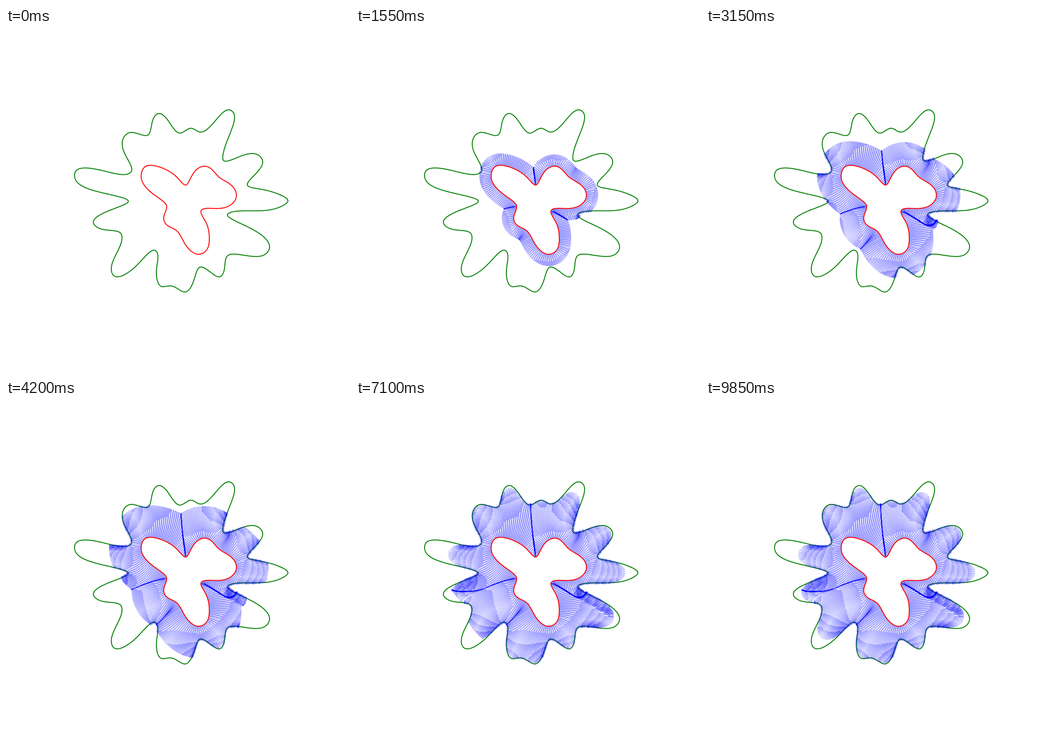
An HTML page with a canvas that plays this animation: 748x748 px, repeating every 10000 ms.

```html
<!DOCTYPE html>
<html lang="en">
<head>
<meta charset="utf-8">
<title>Growing field lines</title>
<style>
html, body { margin: 0; width: 100%; height: 100%; overflow: hidden; background: #fff; }
canvas { display: block; }
</style>
</head>
<body>
<canvas id="stage" width="748" height="748"></canvas>
<script>
const SIZE = 748, LOOP = 10000, TICK = 50, LAST_STEP = 197, SPEED = 0.83;
const LEFT = 120, TOP = 150, COLS = 520, ROWS = 450;

const outerKnots = [
  613,376, 592,361, 545,349, 525,342, 542,318, 558,289, 548,276, 515,277, 473,288, 472,275,
  490,222, 495,185, 485,178, 454,203, 421,226, 402,218, 379,228.5, 350,198, 332,186, 320,198,
  308,233, 272,227, 256,238, 256,268, 273,311, 266,317, 205,309, 152,311, 150,327, 200,356,
  266,377, 215,401, 190,423, 207,437, 249,446, 251,465, 229,522, 235,539, 278,522, 324,483.5,
  329,489, 327,530, 338,562, 360,561, 389,574, 408,550, 422,520, 446,532, 465,541, 474,528,
  481,496, 510,493, 562,493, 573,478, 540,440, 482,405, 487,401.5, 560,397, 604,385];
const innerKnots = [
  433,300.5, 447,307, 463,324, 485,338, 499,354, 500,370, 488,385, 460,392.5, 428,394, 424,398,
  434,421, 442,455, 436,483, 419,492, 400,483, 385,462, 370,440, 350,428.5, 343,412, 349.5,388,
  345,380, 315,357, 294,325, 302,302, 320,299, 350,309, 375,328, 391,341.5, 397,335, 413,309];

// Closed C2 cubic spline, sampled about once per pixel.
function spline(flat) {
  const n = flat.length / 2, knot = i => [flat[2 * (i % n)], flat[2 * (i % n) + 1]];
  const gap = [], slope = [], tangent = [];
  for (let i = 0; i < n; i++) {
    const [ax, ay] = knot(i), [bx, by] = knot(i + 1);
    gap[i] = Math.hypot(bx - ax, by - ay) ** 0.75;
    slope[i] = [(bx - ax) / gap[i], (by - ay) / gap[i]];
    tangent[i] = slope[i].slice();
  }
  for (let pass = 0; pass < 60; pass++) {
    for (let i = 0; i < n; i++) {
      const p = (i + n - 1) % n, q = (i + 1) % n;
      for (let c = 0; c < 2; c++) {
        tangent[i][c] = (3 * (gap[i] * slope[p][c] + gap[p] * slope[i][c])
          - gap[i] * tangent[p][c] - gap[p] * tangent[q][c]) / (2 * (gap[p] + gap[i]));
      }
    }
  }
  const points = [];
  for (let i = 0; i < n; i++) {
    const a = knot(i), b = knot(i + 1), q = (i + 1) % n;
    const count = Math.ceil(Math.hypot(b[0] - a[0], b[1] - a[1]));
    for (let j = 0; j < count; j++) {
      const t = j / count, s = 1 - t;
      points.push([0, 1].map(c => s * s * (1 + 2 * t) * a[c] + t * t * (3 - 2 * t) * b[c]
        + gap[i] * t * s * (s * tangent[i][c] - t * tangent[q][c])));
    }
  }
  return points;
}

function toPath(points) {
  const path = new Path2D();
  points.forEach(p => path.lineTo(p[0], p[1]));
  path.closePath();
  return path;
}

const inner = spline(innerKnots);
const innerPath = toPath(inner), outerPath = toPath(spline(outerKnots));
const normals = inner.map((p, i) => {
  const a = inner[(i + inner.length - 1) % inner.length], b = inner[(i + 1) % inner.length];
  const len = Math.hypot(b[0] - a[0], b[1] - a[1]);
  return [(b[1] - a[1]) / len, (a[0] - b[0]) / len];
});

function newContext(width, height) {
  const canvas = document.createElement("canvas");
  canvas.width = width;
  canvas.height = height;
  return canvas.getContext("2d");
}

// Harmonic potential: 0 inside the red curve, 1 outside the green one.
function solvePotential() {
  const mask = newContext(COLS, ROWS);
  mask.translate(-LEFT, -TOP);
  mask.fillStyle = "#0f0";
  mask.fill(outerPath);
  mask.fillStyle = "#f00";
  mask.fill(innerPath);
  const rgba = mask.getImageData(0, 0, COLS, ROWS).data;
  const field = new Float32Array(COLS * ROWS), free = [];
  for (let i = 0; i < field.length; i++) {
    if (rgba[4 * i + 3] < 128) field[i] = 1;
    else if (rgba[4 * i] < rgba[4 * i + 1]) { field[i] = 0.6; free.push(i); }
  }
  const cells = Int32Array.from(free);
  for (let pass = 0; pass < 220; pass++) {
    for (const i of cells) {
      const mean = (field[i - 1] + field[i + 1] + field[i - COLS] + field[i + COLS]) / 4;
      field[i] += 1.92 * (mean - field[i]);
    }
  }
  return field;
}

const field = solvePotential();

function potential(x, y) {
  x -= LEFT + 0.5;
  y -= TOP + 0.5;
  const c = Math.floor(x), r = Math.floor(y), u = x - c, v = y - r, i = r * COLS + c;
  return (field[i] * (1 - u) + field[i + 1] * u) * (1 - v)
    + (field[i + COLS] * (1 - u) + field[i + COLS + 1] * u) * v;
}

// Distance from the red curve and the direction leading away from it.
function awayFromInner(x, y) {
  let best = Infinity, index = 0;
  for (let i = 0; i < inner.length; i++) {
    const dx = x - inner[i][0], dy = y - inner[i][1], d = dx * dx + dy * dy;
    if (d < best) { best = d; index = i; }
  }
  const dist = Math.sqrt(best);
  if (dist < 2) return { dist, nx: normals[index][0], ny: normals[index][1] };
  return { dist, nx: (x - inner[index][0]) / dist, ny: (y - inner[index][1]) / dist };
}

function advance(p, level, segments) {
  const { dist, nx, ny } = awayFromInner(p.x, p.y);
  p.nx = nx;
  p.ny = ny;
  if (dist >= level) return;
  let gx = potential(p.x + 1.5, p.y) - potential(p.x - 1.5, p.y);
  let gy = potential(p.x, p.y + 1.5) - potential(p.x, p.y - 1.5);
  const steep = Math.hypot(gx, gy) || 1, mix = potential(p.x, p.y);
  gx = mix * gx / steep + (1 - mix) * nx;
  gy = mix * gy / steep + (1 - mix) * ny;
  const len = Math.hypot(gx, gy) || 1;
  gx /= len;
  gy /= len;
  const step = Math.min(2.2, (level - dist) / Math.max(0.3, gx * nx + gy * ny));
  let x = p.x + gx * step, y = p.y + gy * step;
  if (potential(x, y) > 0.995) {
    p.done = true;
    x += 1.8 * gx;
    y += 1.8 * gy;
  }
  segments.push([p.x, p.y, x, y]);
  p.x = x;
  p.y = y;
}

// Fill widening gaps so the advancing front stays evenly covered.
function refine(front) {
  const result = [];
  front.forEach((p, i) => {
    result.push(p);
    const q = front[(i + 1) % front.length];
    if (p.done || q.done || front.length > 3000) return;
    const gap = Math.hypot(q.x - p.x, q.y - p.y);
    if (gap < 3.2 || gap > 14 || p.nx * q.nx + p.ny * q.ny < 0.85) return;
    const x = (p.x + q.x) / 2, y = (p.y + q.y) / 2;
    if (potential(x, y) < 0.99) result.push({ x, y, nx: p.nx, ny: p.ny, done: false });
  });
  return result;
}

function growLines() {
  const count = 480, steps = [[]];
  let front = Array.from({ length: count }, (_, i) => {
    const k = Math.floor(i * inner.length / count);
    return { x: inner[k][0], y: inner[k][1], nx: normals[k][0], ny: normals[k][1], done: false };
  });
  for (let k = 1; k <= LAST_STEP; k++) {
    const segments = [];
    front.forEach(p => { if (!p.done) advance(p, k * SPEED, segments); });
    steps.push(segments);
    front = refine(front);
  }
  return steps;
}

const steps = growLines();
const ctx = document.getElementById("stage").getContext("2d");
const ink = newContext(SIZE, SIZE);
ink.strokeStyle = "#00f";
ink.lineWidth = 0.7;
let drawn = 0;

function drawInk(step) {
  if (step < drawn) {
    ink.clearRect(0, 0, SIZE, SIZE);
    drawn = 0;
  }
  while (drawn < step) {
    ink.beginPath();
    for (const [x0, y0, x1, y1] of steps[++drawn]) {
      ink.moveTo(x0, y0);
      ink.lineTo(x1, y1);
    }
    ink.stroke();
  }
}

function outline(path, color) {
  ctx.strokeStyle = color;
  ctx.lineWidth = 2;
  ctx.lineJoin = "round";
  ctx.stroke(path);
}

let origin = null;
function render(now) {
  if (origin === null) origin = now;
  drawInk(Math.min(LAST_STEP, Math.floor((now - origin) % LOOP / TICK)));
  ctx.fillStyle = "#fff";
  ctx.fillRect(0, 0, SIZE, SIZE);
  outline(outerPath, "#008000");
  ctx.drawImage(ink.canvas, 0, 0);
  outline(innerPath, "#f00");
  requestAnimationFrame(render);
}
requestAnimationFrame(render);
</script>
</body>
</html>
```
